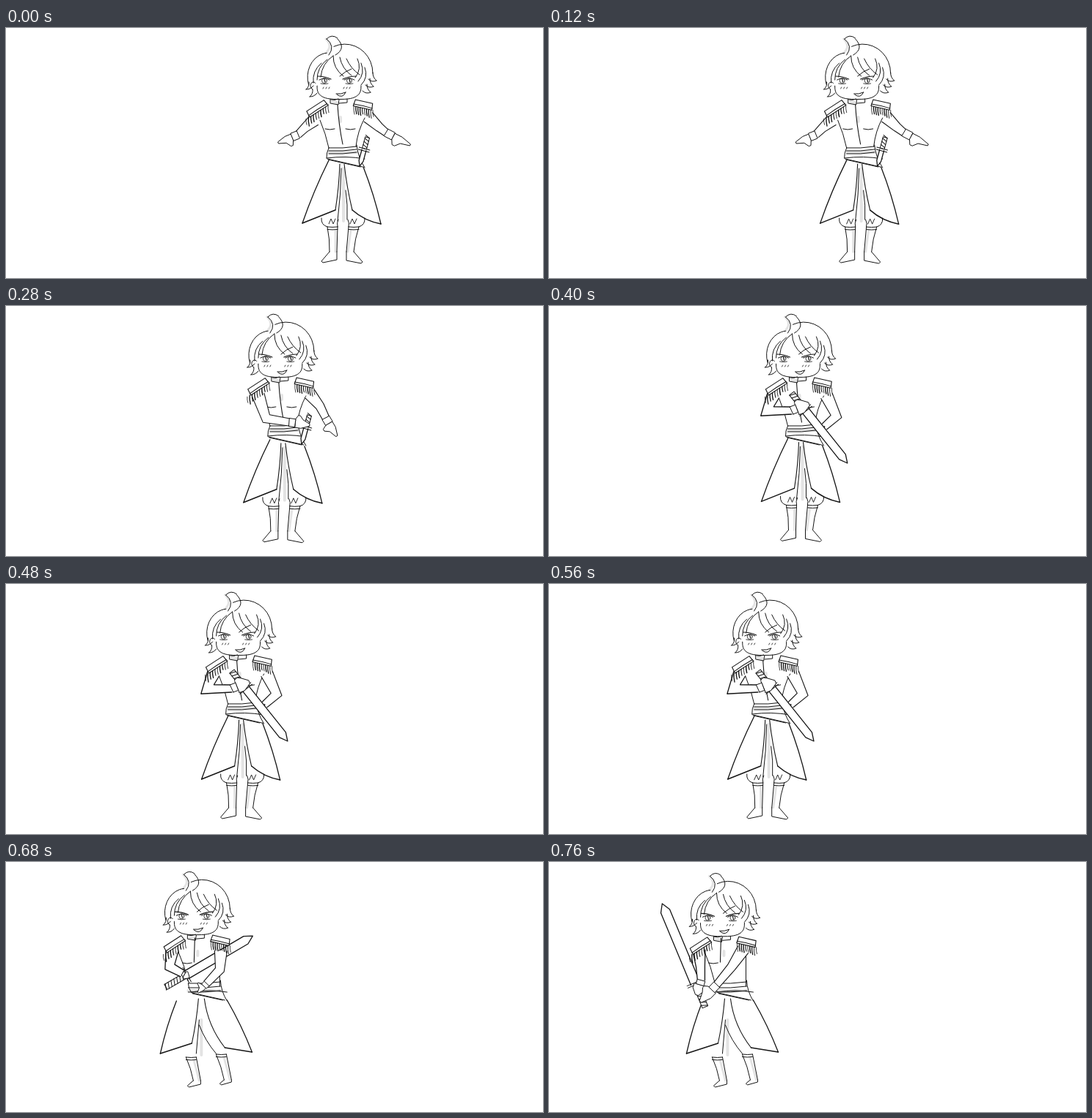
An HTML page with a canvas for the animation above (800 ms loop, 732 by 342 pixels).

```html
<!DOCTYPE html>
<html lang="en">
<head>
<meta charset="utf-8">
<title>Swordsman sketch</title>
<style>
  html, body { margin: 0; width: 100%; height: 100%; overflow: hidden; background: #fff; }
  canvas { display: block; width: 732px; height: 342px; }
</style>
</head>
<body>
<canvas id="stage" width="732" height="342"></canvas>
<script>
const ctx = document.getElementById('stage').getContext('2d');
const STEP = 40, STEPS = 20, SPEED = 11.45;
const INK = '#151515', SHADE = 'rgba(0,0,0,.11)';

const mix = (a, b, f) => a + (b - a) * f;
const blend = (a, b, f) => a.map((v, i) => mix(v, b[i], f));
const clamp = v => Math.min(1, Math.max(0, v));
const noise = n => Math.abs(Math.sin(n * 91.7) * 437.5) % 1;
const shift = ([x, y], [nx, ny], d) => [x + nx * d, y + ny * d];

// Unit normal, turned clockwise from the direction a to b.
function normal([x1, y1], [x2, y2]) {
  const d = Math.hypot(x2 - x1, y2 - y1) || 1;
  return [(y1 - y2) / d, (x2 - x1) / d];
}

function stroke(width, color = INK) {
  ctx.lineWidth = width;
  ctx.strokeStyle = color;
  ctx.stroke();
}

function line(points, { width = 1, closed = false, fill = false, color } = {}) {
  ctx.beginPath();
  points.forEach(p => ctx.lineTo(...p));
  if (closed) ctx.closePath();
  ctx.fillStyle = '#fff';
  if (fill) ctx.fill();
  stroke(width, color);
}

// A bowed stroke; bow is how far its middle leaves the chord.
function arc(x1, y1, x2, y2, bow = 0, width = 1, color) {
  const [cx, cy] = shift([(x1 + x2) / 2, (y1 + y2) / 2], normal([x1, y1], [x2, y2]), bow * 2);
  ctx.beginPath();
  ctx.moveTo(x1, y1);
  ctx.quadraticCurveTo(cx, cy, x2, y2);
  stroke(width, color);
}

function oval(x, y, rx, ry, from = 0, to = 2, width = 1) {
  ctx.beginPath();
  ctx.ellipse(x, y, rx, ry, 0, from * Math.PI, to * Math.PI);
  stroke(width);
}

function at(x, y, degrees, paint) {
  ctx.save();
  ctx.translate(x, y);
  ctx.rotate(degrees * Math.PI / 180);
  paint();
  ctx.restore();
}

// Arms: shoulder, elbow, wrist, finger tips, hand width. Sword: x, y, angle, blade, hilt, width.
const rest = {
  left: [420, 126, 407, 137, 398, 146, 371, 157, 9],
  right: [494, 122, 509, 136, 518, 143, 551, 160, 9],
  sword: [488, 167, 105, 23, 18, 6]
};
const reach = {
  left: [424, 122, 435, 154, 466, 159, 494, 163, 12],
  right: [494, 120, 508, 137, 516, 153, 531, 178, 10],
  sword: [489, 167, 105, 23, 18, 6]
};
const show = {
  left: [420, 123, 412, 144, 445, 143, 469, 134, 18],
  right: [493, 123, 506, 151, 490, 165, 489, 166, 2],
  sword: [464, 143, 51.5, 92, 30, 11]
};
const guard = {
  left: [422, 121, 424, 143, 425, 162, 419, 182, 16],
  right: [482, 120, 466, 144, 446, 168, 424, 191, 14],
  sword: [417, 166, -112.5, 118, 35, 13]
};
const keys = [[0, rest], [3, rest], [7, reach], [8, reach], [10, show], [15, show], [19, guard]];

// Panels: waist, hem corner, slit top, slit end, bow of slit, bow of hem.
const standing = {
  sides: [[428, 126, 440, 164, -1], [489, 123, 477, 162, 2]],
  front: [452, 105, 459, 159, 1],
  belt: [440, 478, 164, 170],
  sash: [437, 178, 489, 191],
  panels: [[440, 181, 404, 267, 455, 186, 449, 249, -1, 0], [487, 190, 511, 268, 461, 186, 472, 249, 1, -3]],
  inseams: [[457, 192, 452, 264, -1], [463, 222, 465, 262, -1]],
  legs: [[445, 272, 446, 306, 430, 319], [474, 272, 469, 306, 486, 320]],
  puffed: true
};
const lunging = {
  sides: [[430, 124, 443, 163, -1], [486, 125, 486, 170, 0]],
  front: [452, 104, 451, 137, 0],
  belt: [443, 487, 166, 176],
  sash: [447, 178, 496, 190],
  panels: [[427, 190, 405, 262, 457, 187, 448, 248, -1, 0], [496, 189, 530, 260, 465, 187, 493, 254, 5, 0]],
  inseams: [[458, 216, 454, 262, 0], [458, 223, 481, 262, 2]],
  legs: [[447, 267, 455, 299, 442, 306], [488, 263, 497, 298, 486, 303]],
  puffed: false
};

function panel([wx, wy, hx, hy, sx, sy, ex, ey, bow, sag]) {
  const out = Math.sign(hx - wx);
  arc(wx, wy, hx, hy, -out * 1.5, 1.3);
  arc(hx, hy, ex, ey, sag, 1.5);
  arc(sx, sy, ex, ey, bow, 1.1);
}

function leg([kx, ky, ax, ay, tx, ty], puffed) {
  const d = Math.sign(tx - ax), front = ax + d * 5, back = ax - d * 5;
  arc(kx + d * 7, ky, front, ay, d);
  arc(kx - d * 7, ky, back, ay, 0);
  line([[front, ay], [tx, ty], [tx - d * 2, ty + 2], [back, ty - 2], [back, ay]]);
  for (const y of [0, 3.5]) arc(kx - 7, ky + y, kx + 7, ky + y, .5);
  arc(kx - d * 4, ky + 5, back + d * 2, ay, 0, 3, SHADE);
  if (!puffed) return;
  arc(kx + d * 15, ky - 12, kx + d * 7, ky, -d * 3);
  arc(kx - d * 8, ky - 10, kx - d * 7, ky, -d);
  line([0, 1, 2, 3].map(i => [kx - 5 + i * 3, ky - (i % 2 ? 11 : 4)]), { width: .9 });
}

function drawLower(s) {
  const [x, y] = s.inseams[0];
  arc(x + 3, y, x + 3, 264, 0, 4, SHADE);
  s.inseams.forEach(a => arc(...a));
  s.legs.forEach(l => leg(l, s.puffed));
  s.panels.forEach(panel);
}

function drawTorso(s) {
  s.sides.forEach(a => arc(...a));
  arc(...s.front, 1.1);
  arc(456, 122, 456, 128, 0, 4, SHADE);
  for (const x of [435, 463]) arc(x, 138, x + 13, 138, 1);
  const [l, r, top, bottom] = s.belt, [x1, y1, x2, y2] = s.sash;
  for (let i = 0; i < 3; i++) {
    const y = mix(top, bottom, i / 2) + i;
    arc(l, y, r, y - 2, 1);
    arc(x1 + i, y1 + i, x2 - 3 * i, y2 - (i ? 1 : 12), i ? 0 : -2);
  }
  arc(l, top, x1, y1, 1);
  arc(r, top - 4, x2, y2, 2);
  arc(l, bottom, r, bottom, 0, 4, SHADE);
}

function arm(points, side, width) {
  const [s, e, w, t] = [0, 2, 4, 6].map(i => points.slice(i, i + 2)), fat = points[8];
  const n1 = normal(s, e), n2 = normal(e, w);
  const sum = [n1[0] + n2[0], n1[1] + n2[1]], len = Math.hypot(...sum);
  const bend = sum.map(v => 2 * v / len ** 2);
  const edge = k => [shift(s, n1, 8.5 * k), shift(e, bend, 6 * k), shift(w, n2, 5 * k)];
  const a = edge(1), b = edge(-1);
  ctx.beginPath();
  [...a, ...b.reverse()].forEach(p => ctx.lineTo(...p));
  ctx.fillStyle = '#fff';
  ctx.fill();
  line(a, { width });
  line(b, { width });

  const n = normal(w, t), size = clamp(Math.hypot(t[0] - w[0], t[1] - w[1]) / 20);
  const on = (f, d) => shift(blend(w, t, f), n, d * side * size);
  const thumb = Math.max(11, fat / 2), h = fat / 2;
  line([on(.3, -h), on(.6, -h), on(1, -h / 4), on(1, h / 4), on(.65, h),
    on(.5, thumb), on(.4, thumb), on(.3, h)], { closed: true, fill: true });
  line([on(0, -5.5), on(.3, -5.5), on(.3, 5.5), on(0, 5.5)], { closed: true, fill: true });
}

function sword([x, y, angle, blade, hilt, w]) {
  const h = w / 2, g = Math.min(h, 4), cap = Math.min(11, blade / 3), bar = w * .6 + 4;
  at(x, y, angle, () => {
    line([[0, -h], [blade - cap, -h], [blade, 0], [blade - cap, h], [0, h]], { width: 1.3, fill: true });
    line([[-2, -g], [-hilt, -g], [-hilt, g], [-2, g]], { closed: true, fill: true });
    for (let d = 4; d < hilt; d += 4.5) line([[-d, -g], [-d - 3, g]]);
    for (const d of [-2, 1]) line([[d, -bar], [d, bar]]);
  });
}

function epaulette(x, y, tilt, w, h) {
  const slope = Math.tan(tilt * Math.PI / 180), n = 9;
  for (let i = 0; i <= n; i++) {
    const px = x + (i / n - .5) * w, py = y + h / 2 + (px - x) * slope;
    arc(px, py, px + 1, py + 8 + 4 * noise(i + x), .5, .8 + .7 * noise(i));
  }
  at(x, y, tilt, () => {
    const l = -w / 2, r = w / 2, t = -h / 2, b = h / 2;
    line([[l, b], [l + 1, t], [r - 1, t], [r, b]], { closed: true, fill: true, width: 1.1 });
    arc(l, b - 2.5, r, b - 2.5, -.5);
  });
}

function eye(x, y, inward) {
  arc(x - inward * 9, y - 5, x + inward * 9, y - 1, -inward, 1.2);
  arc(x - inward * 7, y, x + inward * 7, y, -inward * 2, 1);
  oval(x, y + 1, 3.5, 3.5, 0, 2, .8);
  arc(x, y - 1, x + 1, y + 3, 0, 1.2);
  arc(x - 5, y + 5, x + 5, y + 5, .7, .8);
  for (let i = 0; i < 3; i++) arc(x - inward * (1 - 4 * i) - 1, y + 12, x - inward * (1 - 4 * i), y + 10, 0, .8);
}

function drawHead() {
  // Standing lock of hair
  arc(440, 37, 437, 15, 5.5);
  arc(437, 15, 452, 14, -3.5);
  arc(452, 15, 449, 37, -7);
  arc(436, 34, 436, 15, 5, 3, SHADE);

  oval(440, 67, 29, 33, .9, 1.47);
  oval(462, 62, 38, 40, 1.37, 2);
  for (let i = 0; i < 3; i++) {
    const x = 505 - 4 * i, y = 72 + 8 * i;
    arc(x - 5, y - 11, x, y, 1.5);
    arc(x, y, x - 11, y - 2, -2);
  }
  for (let i = 0; i < 2; i++) {
    const x = 409 + 5 * i, y = 84 + 10 * i;
    arc(x + 4, y - 10, x, y, -1.5);
    arc(x, y, x + 10, y - 5, 1.5);
  }

  // Locks fan out from the parting
  for (let i = 0; i < 3; i++) {
    arc(446 - 8 * i, 38 + 5 * i, 429 - 5 * i, 67 + 4 * i, 4);
    arc(446 + 9 * i, 38 + 2 * i, 460 + 11 * i, 66 - i, 4 - i);
    arc(479 + 5 * i, 42 + 6 * i, 476 + 4 * i, 68 + 5 * i, -4);
  }
  arc(455, 66, 471, 56, -1);

  oval(419, 79, 4, 5, .6, 1.75);
  const jaw = Array.from({ length: 25 }, (_, i) => {
    const a = Math.PI * i / 24, c = Math.cos(a);
    return [454 - 30 * Math.sign(c) * Math.abs(c) ** .7, 79 + 18.5 * Math.sin(a) ** .7];
  });
  line(jaw);
  eye(434, 71, 1);
  eye(468, 71, -1);
  arc(450, 90, 463, 88, 1);
  arc(451, 91, 463, 88, 4);
}

function drawCollar() {
  arc(443, 98, 453, 97, 1);
  line([[442, 97], [442, 103], [453, 105], [454, 98]]);
  line([[454, 103], [465, 102], [465, 97]]);
  arc(445, 101, 451, 102, 0, 4, SHADE);
}

function poseAt(step) {
  const i = Math.min(keys.length - 2, keys.findLastIndex(k => k[0] <= step));
  const [from, a] = keys[i], [to, b] = keys[i + 1], f = (step - from) / (to - from);
  return Object.fromEntries(Object.keys(a).map(k => [k, blend(a[k], b[k], f)]));
}

function draw(step) {
  const pose = poseAt(step), guarding = step > 16;
  const body = guarding ? lunging : standing;
  const dip = 1.8 * Math.exp(-(((step - 7) / 2.5) ** 2));
  const bow = 4.3 * clamp((step - 15) / 4);
  const rightArm = () => arm(pose.right, 1, 1.1);
  ctx.fillStyle = '#fff';
  ctx.fillRect(0, 0, 732, 342);
  at(-SPEED * step, 0, 0, () => {
    at(0, dip, 0, () => drawLower(body));
    drawTorso(body);
    if (!guarding) rightArm();
    sword(pose.sword);
    arm(pose.left, -1, step > 8 ? 1.3 : 1.05);
    if (guarding) rightArm();
    at(0, bow, 0, () => {
      epaulette(424, 110, -33, 30, 9);
      epaulette(487, 105, 13, 26, 9);
      drawCollar();
      drawHead();
    });
  });
}

ctx.lineCap = ctx.lineJoin = 'round';
const start = performance.now();
let shown = -1;
function tick() {
  const step = Math.floor((performance.now() - start) / STEP) % STEPS;
  if (step !== shown) draw(shown = step);
  requestAnimationFrame(tick);
}
tick();
</script>
</body>
</html>
```
